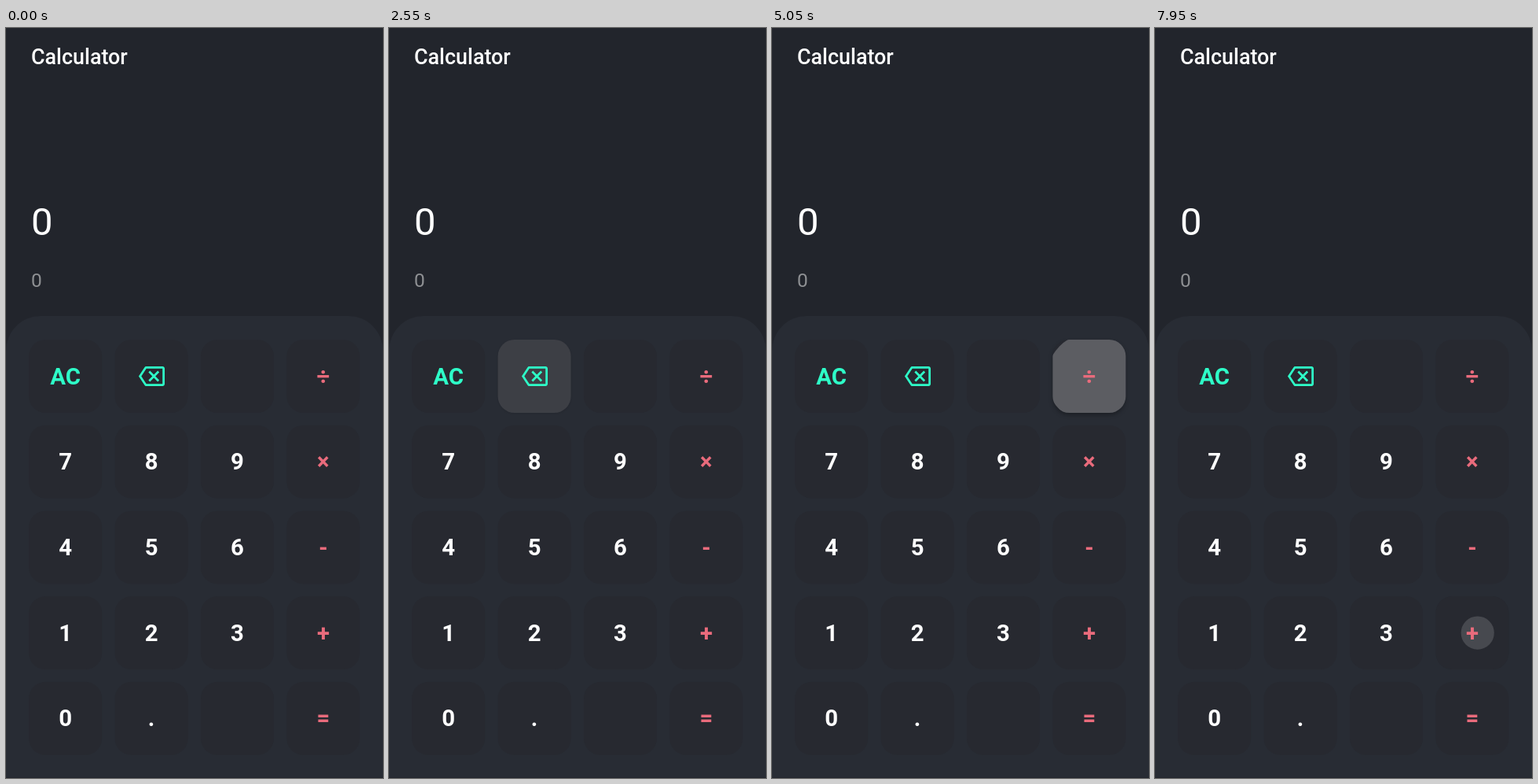
These frames come from a looping animation (480x953 px, 8 s). An HTML page:

```html
<!DOCTYPE html>
<html lang="en">
<head>
<meta charset="utf-8">
<title>Calculator</title>
<style>
  html, body { margin: 0; height: 100%; overflow: hidden; background: #22252c; }
  svg { display: block; width: 100vw; height: 100vh; }
  text { font-family: Roboto, sans-serif; fill: #fff; }
  .key text { font-size: 29.4px; font-weight: 700; text-anchor: middle; }
  .key .clear { fill: #2effc8; }
  .key .operator { fill: #e96b7c; }
</style>
</head>
<body>
<svg viewBox="0 0 480 953">
  <rect width="480" height="953" fill="#22252c"/>
  <text x="32" y="46" font-size="26.9" font-weight="500">Calculator</text>
  <text x="32" y="263" font-size="49">0</text>
  <text x="32" y="329.3" font-size="24.5" style="fill:#8e9093">0</text>
  <path d="M0 952V410A44 44 0 0 1 44 366H436A44 44 0 0 1 480 410V952Z" fill="#282c34"/>
  <g id="keys"></g>
</svg>
<script>
const LOOP = 8000;
const SIZE = 93, CORNER = 21;
const START_RADIUS = 19.7, END_RADIUS = 71.9;
const GROW = 1060, GROW_RELEASED = 225, RELEASE_BEFORE_END = 160;
const FADE_IN = 75, FADE_OUT = 120, LIFT = 200;

const BACKSPACE = 'M22 3H7c-.69 0-1.23.35-1.59.88L0 12l5.41 8.11c.36.53.9.89 1.59.89h15c1.1 0 2-.9 2-2V5c0-1.1-.9-2-2-2zm0 16H7.07L2.4 12l4.66-7H22v14zm-11.59-2L14 13.41 17.59 17 19 15.59 15.41 12 19 8.41 17.59 7 14 10.59 10.41 7 9 8.41 12.59 12 9 15.59z';

const LABELS = ['AC', '⌫', '', '÷', '7', '8', '9', '×', '4', '5', '6', '-', '1', '2', '3', '+', '0', '.', '', '='];

// dx, dy: touch point relative to the key centre
const PRESSES = [
  { label: '=', start: 548, end: 1050, dx: 13.4, dy: 5.5 },
  { label: '⌫', start: 2133, end: 2600, dx: 13, dy: 4.5 },
  { label: 'AC', start: 3202, end: 3700, dx: 28.4, dy: 16.3 },
  { label: '÷', start: 4640, end: 5200, dx: 10, dy: 7.5 },
  { label: '×', start: 5640, end: 6200, dx: 9, dy: 6 },
  { label: '-', start: 6735, end: 7200, dx: 8, dy: 4 },
  { label: '+', start: 7905, end: 8400, dx: 7, dy: 0 }
];

const clamp = v => Math.min(1, Math.max(0, v));

// cubic-bezier(.25, .1, .25, 1)
function ease(x) {
  const bezier = (a, b, u) => 3 * a * u * (1 - u) ** 2 + 3 * b * u * u * (1 - u) + u ** 3;
  let low = 0, high = 1;
  for (let i = 0; i < 24; i++) {
    const mid = (low + high) / 2;
    if (bezier(.25, .25, mid) < x) low = mid; else high = mid;
  }
  return bezier(.1, 1, low);
}

function add(parent, tag, attributes) {
  const node = document.createElementNS('http://www.w3.org/2000/svg', tag);
  for (const name in attributes) node.setAttribute(name, attributes[name]);
  return parent.appendChild(node);
}

function makeKey(label, index) {
  const x = 75.7 + index % 4 * 109.4;
  const y = 442.5 + Math.floor(index / 4) * 108.7;
  const group = add(document.getElementById('keys'), 'g', { class: 'key', transform: `translate(${x} ${y})` });
  const box = { x: -SIZE / 2, y: -SIZE / 2, width: SIZE, height: SIZE, rx: CORNER };
  const face = add(group, 'rect', { ...box, fill: '#272930' });
  add(add(group, 'clipPath', { id: 'clip' + index }), 'rect', box);
  const inkLayer = add(group, 'g', { 'clip-path': `url(#clip${index})` });
  const ripple = add(inkLayer, 'circle', { fill: '#fff', 'fill-opacity': 0 });
  if (label === '⌫') {
    add(group, 'path', { d: BACKSPACE, fill: '#2effc8', transform: 'translate(.4 0) scale(1.377) translate(-12 -12)' });
  } else {
    const kind = label === 'AC' ? 'clear' : '÷×-+='.includes(label) ? 'operator' : '';
    add(group, 'text', { y: 10, class: kind }).textContent = label;
  }
  return { label, face, ripple };
}

const keys = LABELS.map(makeKey);
for (const press of PRESSES) press.key = keys.find(key => key.label === press.label);

function drawPress({ key, start, end, dx, dy }, time) {
  const active = time >= start && time < end;
  const release = end - RELEASE_BEFORE_END;
  const held = Math.min(time, release) - start;
  const released = Math.max(0, time - release);
  const growth = ease(clamp(held / GROW + released / GROW_RELEASED));
  const alpha = active ? .245 * clamp((time - start) / FADE_IN) * clamp((end - time) / FADE_OUT) : 0;
  const lift = active ? clamp(held / LIFT) * clamp(1 - released / RELEASE_BEFORE_END) : 0;

  key.ripple.setAttribute('cx', dx * (1 - growth));
  key.ripple.setAttribute('cy', dy * (1 - growth));
  key.ripple.setAttribute('r', START_RADIUS + (END_RADIUS - START_RADIUS) * growth);
  key.ripple.setAttribute('fill-opacity', alpha);
  key.face.style.filter = lift ? `drop-shadow(0 ${4 * lift}px ${3 * lift}px rgba(0,0,0,${.3 * lift}))` : 'none';
}

function draw(now) {
  const time = now % LOOP;
  for (const press of PRESSES) drawPress(press, time);
  requestAnimationFrame(draw);
}
requestAnimationFrame(draw);
</script>
</body>
</html>
```
